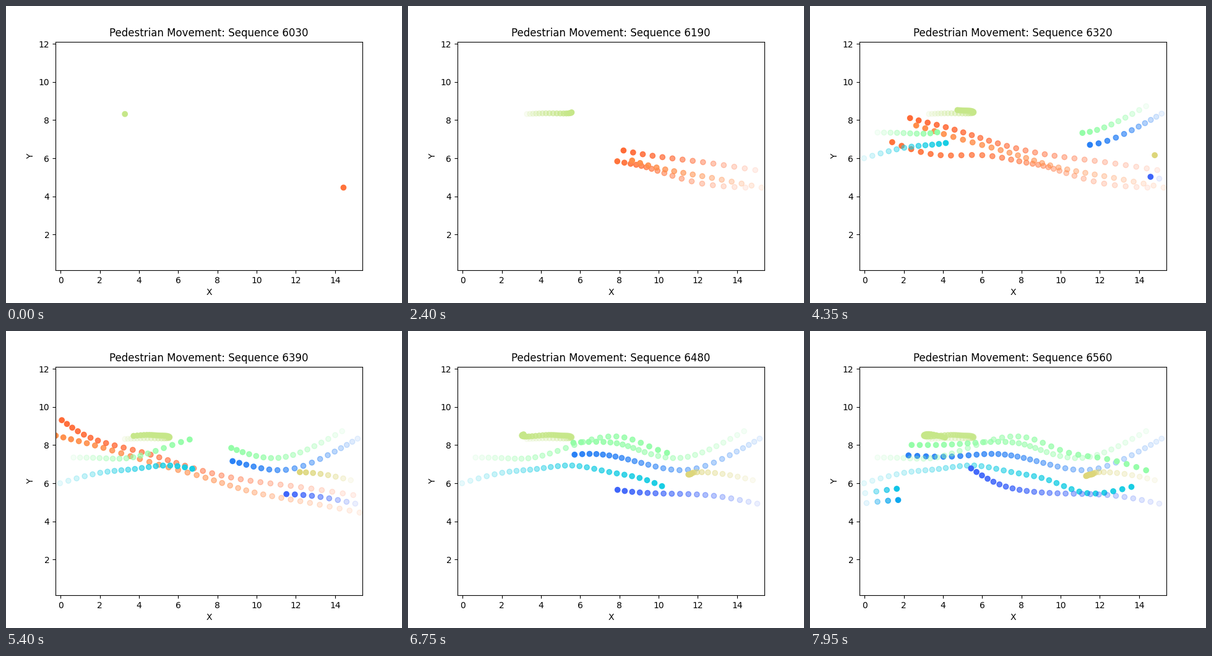
A matplotlib script for the animation above (8 s loop, 640x480 px).

```python
import numpy as np
import matplotlib.pyplot as plt
from matplotlib.animation import FuncAnimation

TICK_MS, TICKS, TICKS_PER_STEP = 50, 160, 3
END = (TICKS - 1) // TICKS_PER_STEP

walkers = []


def smooth_path(keys, count):
    """Sample a natural cubic spline through evenly timed key points."""
    p = np.array(keys, float)
    inner = len(p) - 2
    system = 4 * np.eye(inner) + np.eye(inner, k=1) + np.eye(inner, k=-1)
    bend = np.pad(np.linalg.solve(system, 6 * np.diff(p, 2, axis=0)),
                  ((1, 1), (0, 0)))
    t = np.linspace(0, len(p) - 1, count)
    i = np.minimum(t.astype(int), len(p) - 2)
    u = (t - i)[:, None]
    w = 1 - u
    return (w * p[i] + u * p[i + 1]
            + ((w ** 3 - w) * bend[i] + (u ** 3 - u) * bend[i + 1]) / 6)


def walk(hue, first, last, *keys):
    """A pedestrian seen from step first to step last, passing the keys."""
    path = smooth_path(keys, last - first + 1)
    walkers.append((first, last, path, plt.cm.rainbow(hue)))


walk(0.64, 0, END, (3.28, 8.32), (4.36, 8.36), (5.43, 8.36), (5.45, 8.48),
     (4.96, 8.51), (4.23, 8.53), (3.16, 8.45), (3.22, 8.58), (4.10, 8.40))
walk(0.85, 0, 32, (14.43, 4.46), (12.22, 4.67), (10.29, 5.22), (9.12, 5.60),
     (7.89, 5.84), (6.00, 6.16), (3.88, 6.16), (1.89, 6.65), (-0.03, 7.49))
walk(0.81, 2, 36, (15.25, 4.46), (12.39, 5.03), (9.75, 5.55), (7.39, 6.29),
     (4.69, 7.07), (2.04, 7.90), (-0.25, 8.50))
walk(0.86, 3, 36, (14.93, 5.38), (12.00, 5.83), (9.19, 6.21), (6.57, 6.85),
     (4.14, 7.63), (1.71, 8.31), (0.06, 9.31))
walk(0.30, 18, END, (-0.03, 6.00), (2.02, 6.55), (3.79, 6.75), (5.59, 6.93),
     (7.48, 6.59), (9.41, 6.16), (11.36, 5.48), (13.61, 5.81))
walk(0.17, 19, END, (15.15, 8.34), (13.68, 7.50), (11.62, 6.72), (9.63, 6.93),
     (7.98, 7.36), (6.37, 7.54), (4.39, 7.40), (2.24, 7.46))
walk(0.54, 20, END, (0.66, 7.35), (2.03, 7.32), (3.44, 7.32), (5.00, 7.75),
     (6.80, 8.35), (8.51, 8.34), (10.31, 7.63), (12.31, 7.28), (14.36, 6.68))
walk(0.54, 20, END, (14.36, 8.73), (12.69, 7.82), (10.95, 7.32), (9.24, 7.65),
     (7.91, 8.09), (6.21, 8.16), (4.34, 8.03), (2.40, 8.01))
walk(0.13, 28, END, (15.03, 4.93), (12.82, 5.34), (10.67, 5.45), (8.65, 5.55),
     (6.88, 5.94), (5.43, 6.78))
walk(0.68, 29, END, (14.80, 6.16), (13.26, 6.49), (11.96, 6.58), (11.65, 6.49),
     (11.52, 6.46), (11.41, 6.43), (11.30, 6.38))
walk(0.23, 50, END, (0.10, 4.96), (0.93, 5.06), (1.71, 5.12))
walk(0.28, 50, END, (0.03, 5.48), (0.87, 5.61), (1.64, 5.71))

fig, ax = plt.subplots(figsize=(6.4, 4.8), dpi=100)
ax.set(xlim=(-0.261, 15.395), ylim=(0.1185, 12.1185), xlabel="X", ylabel="Y")
title = ax.set_title("")
dots = ax.scatter([], [])


def draw(tick):
    step = tick // TICKS_PER_STEP
    places, colors = [], []
    for first, last, path, color in walkers:
        if first <= step <= last:
            count = step - first + 1
            rgba = np.tile(color, (count, 1))
            rgba[:, 3] = np.linspace(1, 0.1, count)[::-1]
            places.append(path[:count])
            colors.append(rgba)
    dots.set_offsets(np.vstack(places))
    dots.set_facecolors(np.vstack(colors))
    title.set_text(f"Pedestrian Movement: Sequence {6030 + 10 * step}")
    return dots, title


anim = FuncAnimation(fig, draw, frames=TICKS, interval=TICK_MS,
                     init_func=lambda: draw(0), repeat=True)
plt.show()
```
